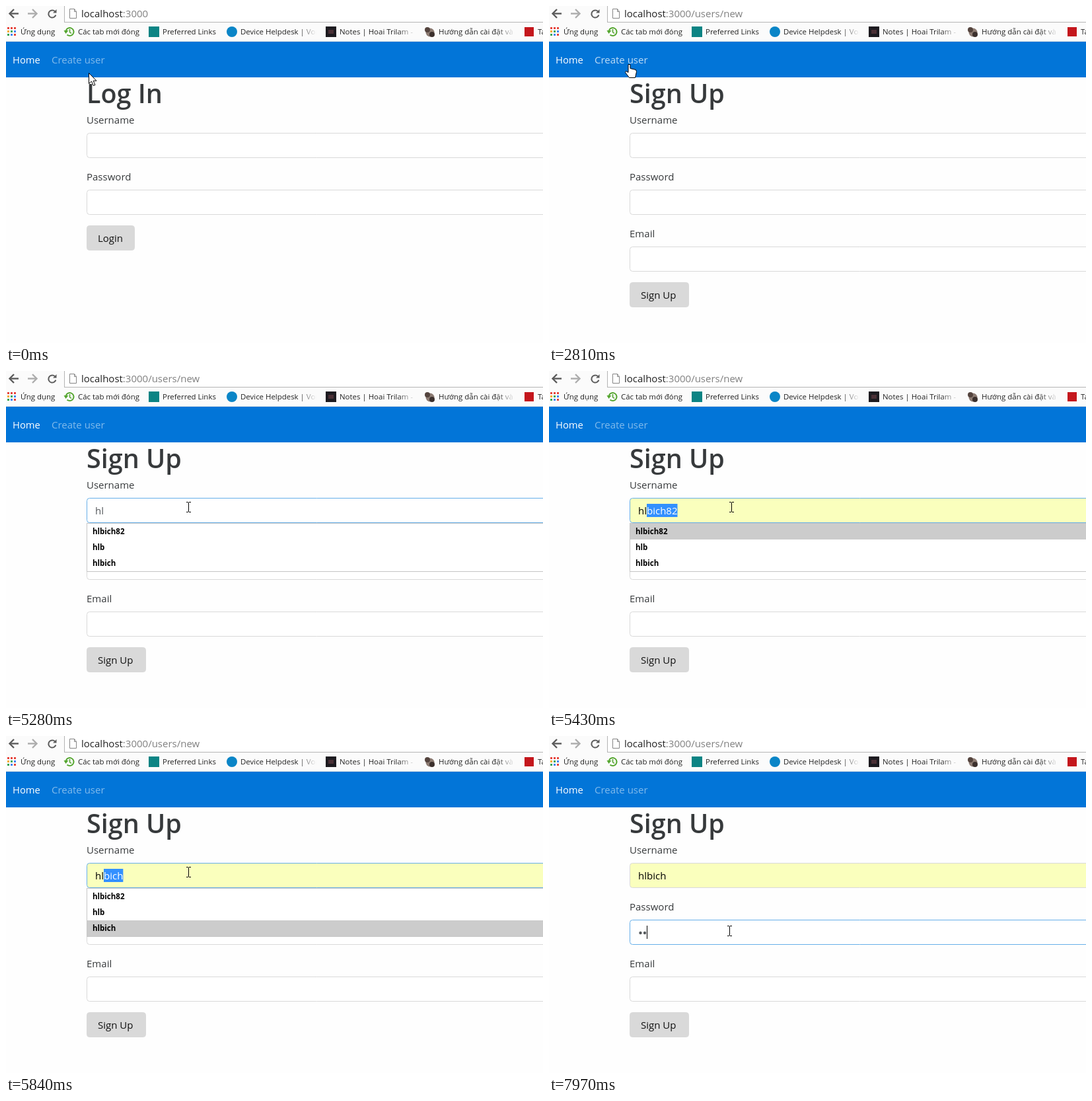
An HTML page with a canvas for the animation above (8000 ms loop, 813 px wide and 510 px high).

```html
<!DOCTYPE html>
<html lang="vi">
<head>
<meta charset="utf-8">
<title>Sign up form</title>
<style>
html, body { margin: 0; width: 813px; height: 510px; overflow: hidden; background: #fefefe; }
canvas { display: block; }
</style>
</head>
<body>
<canvas id="stage" width="813" height="510"></canvas>
<script>
const ctx = document.getElementById("stage").getContext("2d");
const W = 813, H = 510, LOOP = 8000;
const FACE = '"Open Sans", "Noto Sans", sans-serif';
const BODY = "15px " + FACE, ACTIVE = "500 14.8px " + FACE, SMALL = "11.45px " + FACE;
const BOLD = "bold 11.5px " + FACE, TITLE = "600 39.5px " + FACE;
const INK = "#373a3c", LABEL = "#222", ICON = "#5c5c5c", EDGE = "#d9d9d9";
const NAMES = ["hlbich82", "hlb", "hlbich"];
const FIELD = { name: 192, pass: 278, mail: 364 };

// What the user does, in ms
const AT = {
  hover: 260, open: 2680, leave: 3460, focus: 3720, caret: 3860, type: 4570,
  pick: 5430, accept: 5980, next: 7110, secret: 7830
};
const KEY = 130;   // time between two key strokes
const BLINK = 500;

// Pointer trips: start, end, x, y
const START = [125, 101];
const TRIPS = [
  [100, 400, 122, 89], [690, 1100, 259, 213], [1250, 1550, 259, 216],
  [2100, 2680, 121, 88], [3290, 3590, 280, 207], [3600, 3740, 276, 206], [6500, 7110, 273, 295]
];

function pointerAt(t) {
  let [x, y] = START;
  for (const [from, to, tx, ty] of TRIPS) {
    const k = Math.min(1, Math.max(0, (t - from) / (to - from)));
    const ease = k * k * (3 - 2 * k);
    x += (tx - x) * ease;
    y += (ty - y) * ease;
  }
  return [Math.round(x), Math.round(y)];
}

function rect(x, y, w, h, color) {
  ctx.fillStyle = color;
  ctx.fillRect(x, y, w, h);
}

function text(str, x, y, color = INK, font = BODY) {
  ctx.font = font;
  ctx.fillStyle = color;
  ctx.fillText(str, x, y);
  return x + ctx.measureText(str).width;
}

function disc(x, y, r, color) {
  ctx.fillStyle = color;
  ctx.beginPath();
  ctx.arc(x, y, r, 0, 7);
  ctx.fill();
}

function round(x, y, w, h, fill, edge = fill) {
  ctx.beginPath();
  ctx.roundRect(x + 0.5, y + 0.5, w - 1, h - 1, 4);
  ctx.fillStyle = fill;
  ctx.strokeStyle = edge;
  ctx.lineWidth = 1;
  ctx.fill();
  ctx.stroke();
}

function line(points, color, width) {
  ctx.strokeStyle = color;
  ctx.lineWidth = width;
  ctx.beginPath();
  points.forEach(p => ctx.lineTo(...p));
  ctx.stroke();
}

function shape(points, x, y, fill, edge) {
  ctx.beginPath();
  points.forEach(([px, py]) => ctx.lineTo(x + px, y + py));
  ctx.closePath();
  ctx.fillStyle = fill;
  ctx.fill();
  if (!edge) return;
  ctx.strokeStyle = edge;
  ctx.lineWidth = 1;
  ctx.stroke();
}

function arc(x, y, r, from, to, color) {
  ctx.strokeStyle = color;
  ctx.lineWidth = 2;
  ctx.beginPath();
  ctx.arc(x, y, r, from, to);
  ctx.stroke();
}

function arrowIcon(x, dir, color) {
  line([[x - dir * 13, 11.5], [x, 11.5]], color, 2.4);
  line([[x - dir * 6, 5], [x + dir * 0.5, 11.5], [x - dir * 6, 18]], color, 2.4);
}

function pageIcon(x, y) {
  line([[x, y], [x + 7, y], [x + 10, y + 4], [x + 10, y + 14], [x, y + 14], [x, y]], "#858585", 1);
  line([[x + 7, y], [x + 7, y + 4], [x + 10, y + 4]], "#858585", 1);
}

function bookmark(str, x) {
  text(str, x, 43, LABEL, SMALL);
}

function faded(str, x) {
  const g = ctx.createLinearGradient(x + 88, 0, x + 115, 0);
  g.addColorStop(0, LABEL);
  g.addColorStop(1, "rgba(34,34,34,0)");
  text(str, x, 43, g, SMALL);
}

function drawToolbar(path) {
  rect(0, 0, W, 54, "#fbfbfb");
  rect(88, 0, W, 25, "#b4b4b4");
  rect(89, 0, W, 24, "#fff");
  arrowIcon(6, -1, ICON);
  arrowIcon(46, 1, "#adadad");
  arc(70, 12, 5.6, 0.3, 5.5, ICON);
  shape([[0, 0], [0, 5.5], [-5.5, 5.5]], 76.5, 5, ICON);
  pageIcon(96.5, 4.5);
  text(path, text("localhost", 114, 17, "#222"), 17, "#808080");
  rect(0, 53, W, 1, "#e4e4e4");
}

function drawBookmarks() {
  const palette = ["#e8453c", "#f9a825", "#3aa757", "#4285f4"];
  for (let row = 0; row < 3; row++)
    for (let col = 0; col < 3; col++)
      rect(2 + col * 5, 32 + row * 5, 3, 3, palette[row && (row + col) % 4]);
  bookmark("Ứng dụng", 22);

  const green = "#55a630";
  arc(96.5, 39, 6, -2.8, 2.3, green);
  shape([[0, 0], [7, 0], [3, 5]], 87.5, 37, green);
  line([[96.5, 35], [96.5, 39.5], [99, 41.5]], green, 1.6);
  bookmark("Các tab mới đóng", 109);

  rect(216, 31, 16, 16, "#0c8484");
  bookmark("Preferred Links", 237);
  disc(342, 39, 8, "#0a85c7");
  faded("Device Helpdesk | Vor", 355);

  rect(484, 31, 16, 16, "#1d1b20");
  rect(488, 36, 8, 6, "#4a3036");
  faded("Notes | Hoai Trilam -", 505);

  disc(642, 40, 6.5, "#8c7b72");
  disc(638, 36, 4, "#54443e");
  disc(645, 43, 4, "#3b302d");
  faded("Hướng dẫn cài đặt và", 655);
  rect(785, 32, 14, 14, "#c4161c");
  bookmark("Tạ", 805);
}

function drawNav(lit) {
  rect(0, 54, W, 54, "#0275d8");
  text("Home", 10, 87, "#fff", ACTIVE);
  text("Create user", 69, 87, `rgba(255,255,255,${lit ? 0.75 : 0.5})`);
}

function drawField(label, y, focused, fill = "#fff") {
  text(label, 122, y - 14);
  round(122, y, W, 38, fill, focused ? "#66afe9" : EDGE);
}

function drawButton(label, y, w) {
  round(122, y, w, 38, EDGE);
  text(label, 139, y + 25, "#111");
}

function drawCaret(x, field, since, t) {
  if (Math.floor((t - since) / BLINK) % 2 === 0) rect(Math.round(x), field + 9, 1, 20, "#000");
}

function drawList(picked) {
  rect(122, 230, W, 74, "#c6c6c6");
  rect(123, 231, W, 72, "#fff");
  if (picked >= 0) rect(123, 231 + picked * 24, W, 24, "#ccc");
  NAMES.forEach((name, i) => text(name, 131, 247 + i * 24, "#000", BOLD));
}

function drawLogin() {
  text("Log In", 122, 147, INK, TITLE);
  drawField("Username", FIELD.name);
  drawField("Password", FIELD.pass);
  drawButton("Login", 332, 73);
}

function drawName(t, picked) {
  const typed = "hl".slice(0, Math.max(0, 1 + Math.floor((t - AT.type) / (KEY - 10))));
  const base = FIELD.name + 25;
  if (t >= AT.accept) {
    const end = text(NAMES[picked], 135, base, "#000");
    if (t < AT.next) drawCaret(end, FIELD.name, AT.accept + 80, t);
  } else if (picked >= 0) {
    const rest = NAMES[picked].slice(typed.length);
    const mid = text(typed, 135, base, "#000");
    rect(mid, FIELD.name + 9, ctx.measureText(rest).width, 20, "#3390ff");
    text(rest, mid, base, "#fff");
  } else {
    const end = text(typed, 135, base, "#55595c");
    if (typed) drawCaret(end, FIELD.name, AT.type + KEY + 80, t);
    else if (t >= AT.caret) drawCaret(end, FIELD.name, AT.caret - 90, t);
  }
}

function drawSecret(t) {
  const count = Math.max(0, 1 + Math.floor((t - AT.secret) / KEY));
  for (let i = 0; i < count; i++) disc(138.5 + i * 6.5, FIELD.pass + 20, 2.2, "#55595c");
  drawCaret(135 + count * 6.5, FIELD.pass, count ? AT.secret : AT.next + 90, t);
}

function drawSignUp(t) {
  // Three presses of the down key walk through the list
  const presses = [AT.pick, AT.pick + KEY - 10, AT.pick + 3 * KEY + 20];
  const picked = presses.filter(p => t >= p).length - 1;
  const onPass = t >= AT.next;

  text("Sign Up", 122, 147, INK, TITLE);
  drawField("Username", FIELD.name, t >= AT.focus && !onPass, picked >= 0 ? YELLOW : "#fff");
  drawField("Password", FIELD.pass, onPass);
  drawField("Email", FIELD.mail);
  drawButton("Sign Up", 418, 90);
  drawName(t, picked);
  if (onPass) drawSecret(t);
  if (t >= AT.type && t < AT.accept) drawList(picked);
}
const YELLOW = "#faffbd";

const ARROW = [[0, 0], [0, 16], [4, 12.5], [6.8, 19], [9.4, 18], [6.7, 11.7], [11.5, 11.7]];
const HAND = [[-1.5, 0], [1.5, 0], [1.5, 6], [10, 8], [11, 11], [9, 20], [0, 20], [-6, 12], [-5, 10], [-1.5, 12]];

function drawBeam(x, y) {
  rect(x, y - 7, 1, 14, "#000");
  for (const dy of [-8, 7]) {
    rect(x - 3, y + dy, 3, 1, "#000");
    rect(x + 1, y + dy, 3, 1, "#000");
  }
}

function drawPointer(t) {
  const [x, y] = pointerAt(t);
  const inside = top => x > 122 && y >= top && y < top + 38;
  const onLink = y < 100 && x > 61 && x < 157;
  if (inside(FIELD.name) || inside(FIELD.pass)) drawBeam(x, y);
  else shape(onLink ? HAND : ARROW, x + 0.5, y + 0.5, "#fff", "#000");
}

function draw(t) {
  const signUp = t >= AT.open;
  rect(0, 0, W, H, "#fefefe");
  drawToolbar(signUp ? ":3000/users/new" : ":3000");
  drawBookmarks();
  drawNav(t >= AT.hover && t < AT.leave);
  if (signUp) drawSignUp(t);
  else drawLogin();
  drawPointer(t);
}

function loop() {
  draw(performance.now() % LOOP);
  requestAnimationFrame(loop);
}
loop();
</script>
</body>
</html>
```
